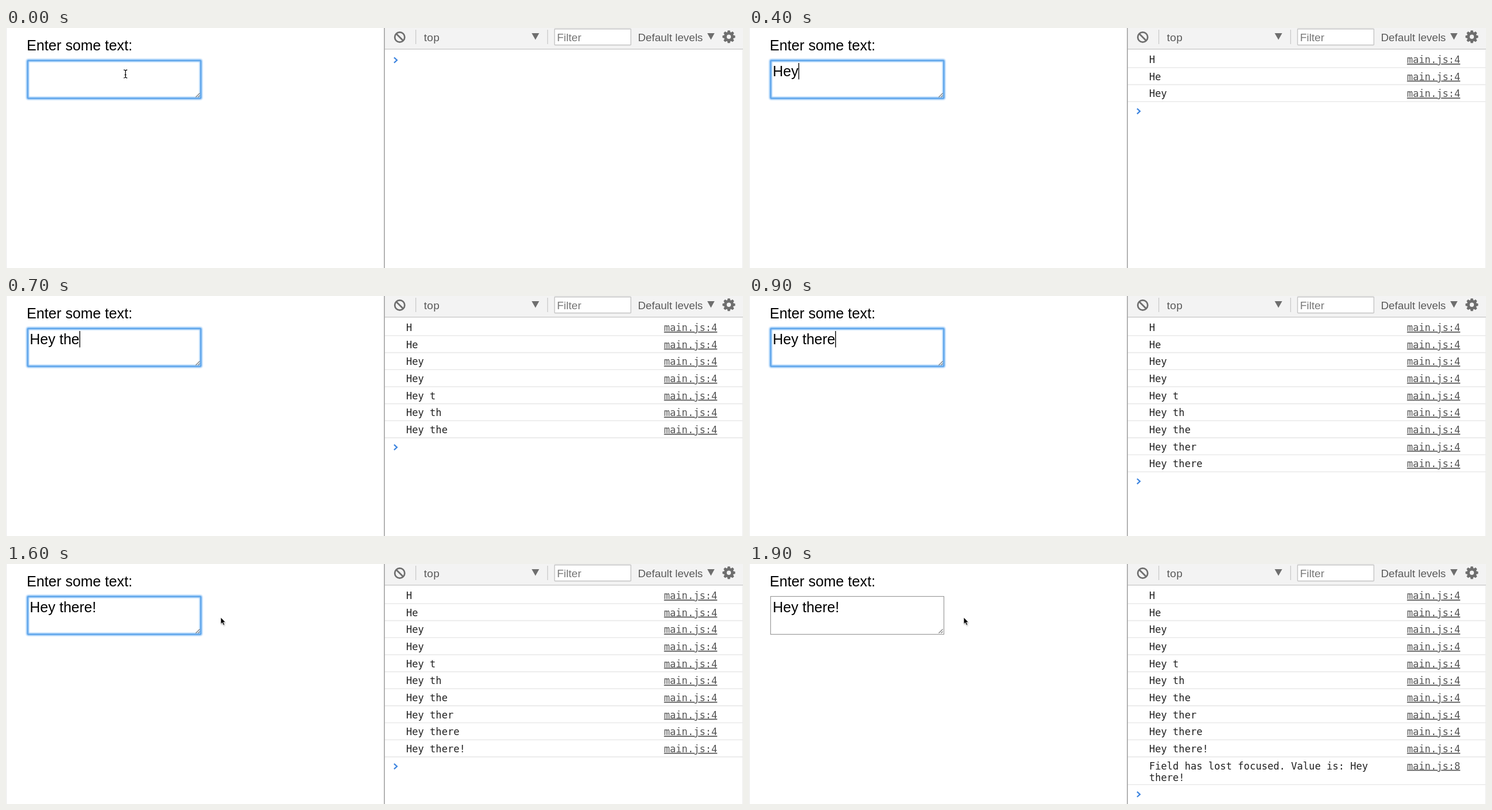
Write an HTML page that moves like this. It is 1280x418 px and loops after 2000 ms.

```html
<!DOCTYPE html>
<html lang="en">
<head>
<meta charset="utf-8">
<title>Input logging</title>
<style>
  html, body { margin: 0; width: 100%; height: 100%; overflow: hidden; background: #fff; }
  svg { display: block; width: 100vw; height: 100vh; }
  text { white-space: pre; }
  .page { font: 25.2px "Liberation Sans", Arial, sans-serif; fill: #000; }
  .typed { font-size: 25px; }
  .bar { font: 19px "Liberation Sans", Arial, sans-serif; fill: #5a5a5a; }
  .log { font: 17.07px "DejaVu Sans Mono", Menlo, monospace; fill: #222; }
  .link { fill: #545454; text-decoration: underline; }
  .rule { stroke: #e9e9e9; stroke-width: 1.6; }
  .sep { stroke: #ccc; stroke-width: 1.4; }
  .icon { fill: #6e6e6e; }
</style>
</head>
<body>
<svg viewBox="0 0 1280 418">
  <defs>
    <filter id="soft" x="-10%" y="-20%" width="120%" height="140%"><feGaussianBlur stdDeviation="1.3"/></filter>
  </defs>
  <rect width="1280" height="418" fill="#fff"/>
  <path d="M.5 0V418" stroke="#e8e8e8"/>

  <text class="page" x="36" y="38.7">Enter some text:</text>
  <rect id="plain" x="37.5" y="56.5" width="301" height="66" fill="#fff" stroke="#9b9b9b" stroke-width="1.2"/>
  <g id="focus" fill="none">
    <rect x="37.5" y="56.5" width="301" height="66" rx="1.5" stroke="#8cc2f7" stroke-width="5" filter="url(#soft)"/>
    <rect x="37.7" y="56.8" width="300.6" height="65.6" rx="1" stroke="#5ea4e9" stroke-width="2"/>
  </g>
  <path d="M329.5 120.5l7-7M333.5 120.5l3-3" stroke="#777" stroke-width="1.1"/>
  <text id="typed" class="page typed" x="41.3" y="84"></text>
  <path id="caret" d="M0 61V89.5" stroke="#000" stroke-width="1.4"/>

  <rect x="657" width="623" height="36.5" fill="#f3f3f3"/>
  <path d="M657 36.7H1280" stroke="#ccc" stroke-width="1.6"/>
  <g fill="none" stroke="#6e6e6e" stroke-width="2.7">
    <circle cx="683.8" cy="16" r="8.6"/>
    <path d="M677.8 10l12 12"/>
  </g>
  <path class="sep" d="M711.7 3V28M940.6 3V28"/>
  <text class="bar" x="725.7" y="22.5" letter-spacing=".4">top</text>
  <path class="icon" d="M913 9h13l-6.5 11.5zM1218 9h12.6l-6.3 11.5z"/>
  <rect x="952.7" y="1.6" width="132.6" height="28" rx="1" fill="#fff" stroke="#c9c9c9" stroke-width="1.6"/>
  <text class="bar" x="957" y="22.5" style="fill:#777">Filter</text>
  <text class="bar" x="1097.5" y="22.5" style="font-size:18.8px">Default levels</text>
  <g transform="translate(1255.4 15.2)">
    <g id="teeth" class="icon"></g>
    <circle r="6" fill="none" stroke="#6e6e6e" stroke-width="4.6"/>
  </g>

  <g id="rows"></g>
  <path id="prompt" d="M674 -4.6l5 4.6l-5 4.6" fill="none" stroke="#3f86e0" stroke-width="2.3"/>
  <path d="M657.2 0V418" stroke="#a0a0a0" stroke-width="1.6"/>
  <path d="M1279.5 37V418" stroke="#ececec"/>

  <path id="beam" d="M-3 -7q3 0 3 2.5q0 -2.5 3 -2.5M0 -5V5M-3 7q3 0 3 -2.5q0 2.5 3 2.5M-1.5 1.5h3" fill="none" stroke="#111" stroke-width="1.3"/>
  <g id="arrow">
    <path d="M.6 1.5v12l2.7 -2.5l2.2 4.2l2 -1l-2 -4h3.5z" fill="#000" opacity=".3" filter="url(#soft)"/>
    <path d="M0 0v11.6l2.6 -2.5l2 4.4l2 -.9l-2 -4.2h3.5z" fill="#000" stroke="#fff" stroke-width=".7"/>
  </g>
</svg>
<script>
  const $ = id => document.getElementById(id);
  const DURATION = 2000, PITCH = 29.65, BLUR_AT = 1700;
  const MESSAGE = "Hey there!";

  // [start ms, typed letters, caret shown, pointer kind, pointer x, pointer y]
  const STEPS = [
    [0, 0, false, "beam", 207.5, 80],
    [100, 0, true, "beam", 207.5, 80],
    [200, 1, true],
    [300, 2, true],
    [400, 3, true],
    [500, 4, true],
    [600, 5, true],
    [700, 7, true],
    [800, 8, true],
    [900, 9, true],
    [1100, 10, true],
    [1400, 10, true, "beam", 250, 83],
    [1500, 10, false, "arrow", 364, 92],
    [1600, 10, false, "arrow", 373, 93]
  ];

  function add(parent, tag, attrs, content = "") {
    const node = document.createElementNS("http://www.w3.org/2000/svg", tag);
    for (const key in attrs) node.setAttribute(key, attrs[key]);
    node.textContent = content;
    return parent.appendChild(node);
  }

  for (let i = 0; i < 8; i++) {
    add($("teeth"), "path", { d: "M-3 -7L-1.9 -11H1.9L3 -7z", transform: `rotate(${i * 45})` });
  }

  function logRow(index, lines, link) {
    const row = add($("rows"), "g", {});
    const y = 61 + index * PITCH, extra = (lines.length - 1) * 20.3;
    lines.forEach((line, i) => add(row, "text", { class: "log", x: 695, y: y + i * 20.3 }, line));
    add(row, "text", { class: "log link", x: 1142.8, y }, link);
    const ruleY = y + 8 + extra - (extra ? 1.5 : 0);
    add(row, "path", { class: "rule", d: `M658 ${ruleY}H1280` });
    return row;
  }

  const rows = [...MESSAGE].map((_, i) => logRow(i, [MESSAGE.slice(0, i + 1)], "main.js:4"));
  rows.push(logRow(rows.length, ["Field has lost focused. Value is: Hey", "there!"], "main.js:8"));

  const show = (node, on) => node.setAttribute("visibility", on ? "visible" : "hidden");
  const move = (node, x, y) => node.setAttribute("transform", `translate(${x} ${y})`);

  function draw(time) {
    const [, count, caretOn, pointer, px, py] = STEPS.findLast(step => step[0] <= time);
    const blurred = time >= BLUR_AT;
    const rowCount = count + blurred;

    $("typed").textContent = MESSAGE.slice(0, count);
    const width = count ? $("typed").getComputedTextLength() : 0;
    move($("caret"), 42 + width, 0);
    show($("caret"), caretOn);
    show($("focus"), !blurred);

    rows.forEach((row, i) => show(row, i < rowCount));
    move($("prompt"), 0, 56 + rowCount * PITCH + (blurred ? 19 : 0));

    for (const kind of ["beam", "arrow"]) {
      show($(kind), kind === pointer);
      if (kind === pointer) move($(kind), px, py);
    }
  }

  const start = performance.now();
  function tick() {
    draw((performance.now() - start) % DURATION);
    requestAnimationFrame(tick);
  }
  tick();
</script>
</body>
</html>
```
